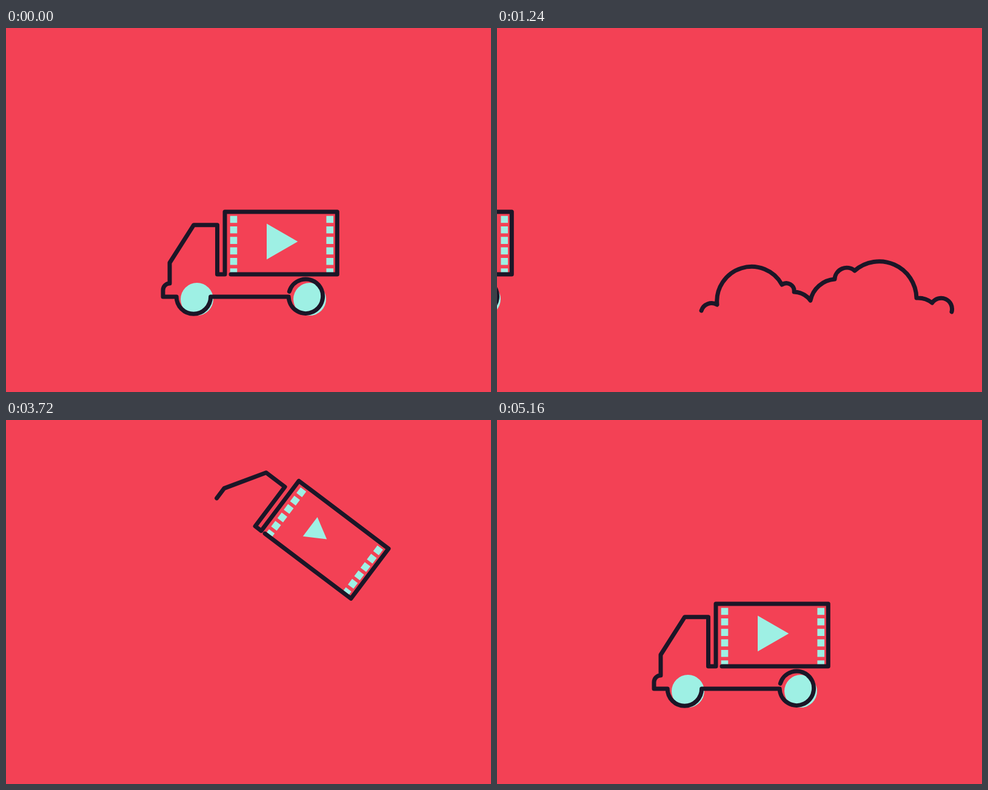
Animation of 800x600 px, one loop 6 s. Source, as an HTML page:

```html
<!DOCTYPE html>
<html lang="en">
<head>
<meta charset="utf-8">
<title>Film truck</title>
<style>
  html, body { margin: 0; width: 100%; height: 100%; overflow: hidden; background: #f34155; }
  svg { display: block; width: 100vw; height: 100vh; }
  .line { fill: none; stroke: #1b1627; stroke-width: 7; stroke-linecap: round; stroke-linejoin: round; }
  .fill { fill: #9ef0e4; }
</style>
</head>
<body>
<svg viewBox="0 0 800 600">
  <rect width="800" height="600" fill="#f34155"/>
  <g id="truck">
    <g id="load" class="fill">
      <path id="stripL"/>
      <path id="stripR"/>
      <path id="play" d="M430 322.5V381.5L481.3 352Z"/>
    </g>
    <circle id="wheelL" class="fill" cx="315" cy="447"/>
    <circle id="wheelR" class="fill" cx="501" cy="447"/>
    <path id="outline" class="line"/>
  </g>
  <path id="cloud" class="line" pathLength="1"/>
</svg>
<script>
const LOOP = 6000, STEP = 40;
const TAIL = 88;              // lead-in of the outline before the truck itself
const APEX = 3760, FALL = 4280, LAND = 4520;
const el = id => document.getElementById(id);
const [truck, load, stripL, stripR, play, wheelL, wheelR, outline, cloud] =
  ['truck', 'load', 'stripL', 'stripR', 'play', 'wheelL', 'wheelR', 'outline', 'cloud'].map(el);

const span = (t, from, to) => Math.min(1, Math.max(0, (t - from) / (to - from)));
const mix = (a, b, k) => a + (b - a) * k;
const smooth = u => u * u * (3 - 2 * u);
const outCubic = u => 1 - (1 - u) ** 3;
const outBack = u => u <= 0 ? 0 : 1 + 2.70158 * (u - 1) ** 3 + 1.70158 * (u - 1) ** 2;

// Bezier easing with handles (x1, 0) and (x2, 1)
function ease(u, x1, x2) {
  let lo = 0, hi = 1;
  for (let i = 0; i < 30; i++) {
    const s = (lo + hi) / 2, r = 1 - s;
    if (3 * s * r * r * x1 + 3 * s * s * r * x2 + s ** 3 < u) lo = s; else hi = s;
  }
  return smooth(lo);
}

function hermite(u, a, b, va, vb, d) {
  return mix(a, b, smooth(u)) + d * u * (1 - u) * (va * (1 - u) - vb * u);
}

function strip(x) {
  let d = '';
  for (let i = 0; i < 6; i++) {
    d += `M${x} ${309.7 + i * 17.3}h11.6v${i < 5 ? 11.6 : 7.5}h-11.6z`;
  }
  return d;
}

// b moves the body against the wheels
const truckPath = b => `M${371 - TAIL} ${406 + b}H546.3V${303 + b}H361V${406 + b}H348.5V${324.7 + b}` +
  `H309.7L270 ${387 + b}V${421 + b}A11 11 0 0 0 259 432V443H281.2A28.2 28.2 0 0 0 337.6 443` +
  `H466.2A28.2 28.2 0 1 0 467.3 434.4`;

// Puff joints [x, y, radius of the arc that ends here], young and full grown
const YOUNG = [[453, 462, 0], [470, 457, 10], [470, 457, .1], [470, 457, .1], [517, 451, 27],
  [557, 414, 44], [590, 400, 20], [691, 446, 61], [712, 453, 37], [736, 465, 14]];
const GROWN = [[332, 466, 0], [358.3, 456, 18], [470, 421.5, 59.7], [491, 434, 13.5], [517, 449, 36],
  [557, 414, 44], [590, 400, 20], [692, 445, 61.5], [718, 453, 38], [750.6, 468, 18.2]];

const drive = t => 522 * (t / 1240) ** 3.05;

function cloudPath(t) {
  const born = smooth(span(t, 0, 640)), grow = outCubic(span(t, 640, 1560));
  const wheelX = 522 - drive(Math.min(t, 640));
  return YOUNG.map((p, i) => {
    let [x, y, r] = p.map((v, j) => mix(v, GROWN[i][j], grow));
    if (born < 1) {
      x = mix(wheelX, x, born);
      y = mix(465, y, born);
      r = Math.max(.1, r * born);
    }
    return i ? `A${r} ${r} 0 0 1 ${x} ${y}` : `M${x} ${y}`;
  }).join('');
}

// Centre and tilt of the truck while it jumps in
function pose(t) {
  if (t >= LAND) {
    const s = t - LAND;
    const dip = s < 400 ? 12 * Math.exp(-s / 70) * Math.sin(s / 50) : 0;
    return [403, 387 + dip, 0];
  }
  if (t > FALL) {
    const d = LAND - FALL, u = (t - FALL) / d;
    return [
      hermite(u, 476, 403, -.032, 0, d),
      hermite(u, 306, 387, .437, .24, d),
      hermite(u, 17.2, 0, -.0395, 0, d)
    ];
  }
  const q = t - 3720;
  return [
    466 + .0683 * q - .0000899 * q * q,
    192.5 + (t < APEX ? .000165 : .00042) * (t - APEX) ** 2,
    52.6 * (1 - ((t - 3000) / 1689) ** 1.43)
  ];
}

function scaleX(node, k, x) {
  node.setAttribute('transform', `translate(${x} 0) scale(${k} 1) translate(${-x} 0)`);
}

function drawTruck(t) {
  const leaving = t < 1280, shown = leaving || t >= 3040;
  truck.style.display = shown ? '' : 'none';
  if (!shown) return;
  const now = leaving ? LOOP : t;   // a leaving truck is complete

  const s = now - LAND;
  const bounce = s > 0 && now < 5160 ? 6 * Math.exp(-s / 200) * Math.sin(s / 55) : 0;
  outline.setAttribute('d', truckPath(bounce));
  load.setAttribute('transform', `translate(0 ${bounce})`);

  const total = outline.getTotalLength();
  const head = total * ease(span(now, 3000, 4540), .333, .34);
  const tail = TAIL * smooth(span(now, 3000, 3800));
  outline.setAttribute('stroke-dasharray', `${head - tail} ${total * 2}`);
  outline.setAttribute('stroke-dashoffset', -tail);

  scaleX(stripR, smooth(span(now, 3300, 3560)), 534.2);
  scaleX(stripL, smooth(span(now, 3440, 3700)), 375.5);
  const k = outBack(span(now, 3653, 4013));
  play.setAttribute('transform', `translate(403.5 352) scale(${k}) translate(-403.5 -352)`);
  wheelL.setAttribute('r', 27 * outBack(span(now, 3880, 4240)));
  wheelR.setAttribute('r', 27 * outBack(span(now, 4080, 4440)));

  const [x, y, tilt] = pose(now);
  const dx = leaving ? drive(t) : 0;
  truck.setAttribute('transform', `translate(${x - dx} ${y}) rotate(${tilt}) translate(-403 -387)`);
}

function drawCloud(t) {
  const shown = t > 0 && t < 2520;
  cloud.style.display = shown ? '' : 'none';
  if (!shown) return;
  cloud.setAttribute('d', cloudPath(t));
  const left = 1 - ease(span(t, 1840, 2520), .333, .667);
  cloud.setAttribute('stroke-dasharray', left < 1 ? `${left} 2` : 'none');
}

function render(ms) {
  const t = Math.floor((ms % LOOP) / STEP) * STEP;
  drawTruck(t);
  drawCloud(t);
}

stripL.setAttribute('d', strip(369.7));
stripR.setAttribute('d', strip(528.4));

const start = performance.now();
function tick() {
  render(performance.now() - start);
  requestAnimationFrame(tick);
}
tick();
</script>
</body>
</html>
```
